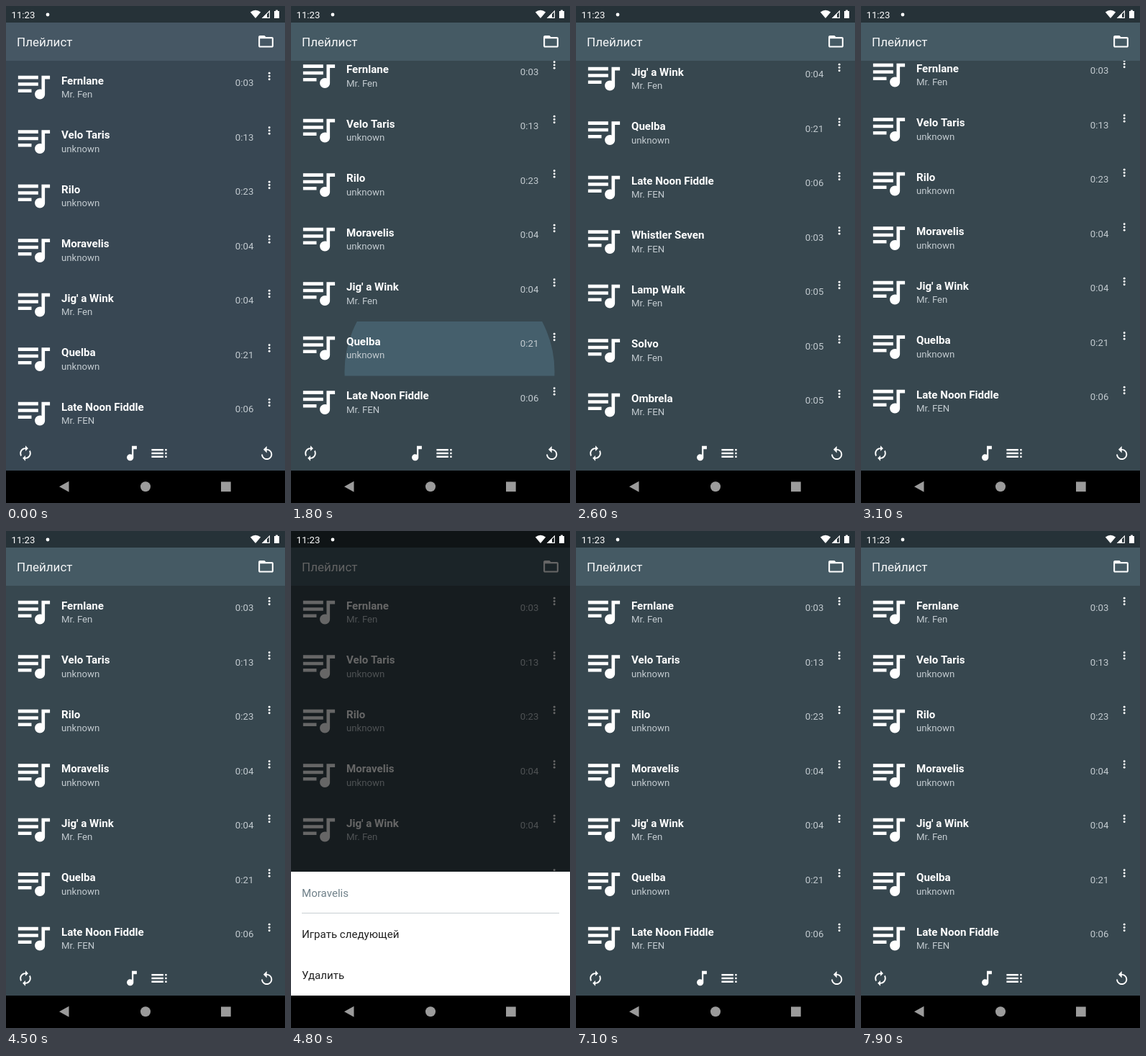
An HTML page with a canvas that plays this animation: 388 px wide and 690 px high, repeating every 8000 ms.

```html
<!DOCTYPE html>
<html lang="ru">
<head>
<meta charset="utf-8">
<style>
  html, body { margin: 0; width: 100%; height: 100%; overflow: hidden; background: #000; }
  canvas { display: block; width: 388px; height: 690px; }
</style>
</head>
<body>
<canvas id="stage"></canvas>
<script>
const W = 388, H = 690, LOOP = 8000, STEP = 100;
const TOP = 76, BOTTOM = 592, NAV = 645, ROW = 75.5;
const SHEET_TOP = 473, SHEET_H = NAV - SHEET_TOP;
const FONT = 'Roboto, "Noto Sans", sans-serif';

const tracks = [
  ['Fernlane', 'Mr. Fen', '0:03'],
  ['Velo Taris', 'unknown', '0:13'],
  ['Rilo', 'unknown', '0:23'],
  ['Moravelis', 'unknown', '0:04'],
  ["Jig' a Wink", 'Mr. Fen', '0:04'],
  ['Quelba', 'unknown', '0:21'],
  ['Late Noon Fiddle', 'Mr. FEN', '0:06'],
  ['Whistler Seven', 'Mr. FEN', '0:03'],
  ['Lamp Walk', 'Mr. Fen', '0:05'],
  ['Solvo', 'Mr. Fen', '0:05'],
  ['Ombrela', 'Mr. FEN', '0:05']
];

// 24-unit icon shapes
const icons = {
  queue: new Path2D('M15 6H3v2h12V6zm0 4H3v2h12v-2zM3 16h8v-2H3v2zM17 6v8.18c-.31-.11-.65-.18-1-.18-1.66 0-3 1.34-3 3s1.34 3 3 3 3-1.34 3-3V8h3V6h-5z'),
  folder: new Path2D('M20 6h-8l-2-2H4c-1.1 0-2 .9-2 2v12c0 1.1.9 2 2 2h16c1.1 0 2-.9 2-2V8c0-1.1-.9-2-2-2zm0 12H4V8h16v10z'),
  renew: new Path2D('M12 6v3l4-4-4-4v3c-4.42 0-8 3.58-8 8 0 1.57.46 3.03 1.24 4.26L6.7 14.8c-.45-.83-.7-1.79-.7-2.8 0-3.31 2.69-6 6-6zm6.76 1.74L17.3 9.2c.44.84.7 1.79.7 2.8 0 3.31-2.69 6-6 6v-3l-4 4 4 4v-3c4.42 0 8-3.58 8-8 0-1.57-.46-3.03-1.24-4.26z'),
  note: new Path2D('M12 3v10.55c-.59-.34-1.27-.55-2-.55-2.21 0-4 1.79-4 4s1.79 4 4 4 4-1.79 4-4V7h4V3h-6z'),
  list: new Path2D('M3 9h14V7H3v2zm0 4h14v-2H3v2zm0 4h14v-2H3v2zm16 0h2v-2h-2v2zm0-10v2h2V7h-2zm0 6h2v-2h-2v2z'),
  replay: new Path2D('M12 5V1L7 6l5 5V7c3.31 0 6 2.69 6 6s-2.69 6-6 6-6-2.69-6-6H4c0 4.42 3.58 8 8 8s8-3.58 8-8-3.58-8-8-8z')
};

// [time, scroll offset]
const scrollKeys = [
  [1700, 0], [1800, 15.5], [1900, 110], [2000, 220], [2100, 288], [2200, 314],
  [2700, 314], [2800, 255], [2900, 125], [3000, 50], [3100, 17], [3200, 4], [3300, 0]
];

const canvas = document.getElementById('stage');
const ctx = canvas.getContext('2d');
const dpr = window.devicePixelRatio || 1;
canvas.width = W * dpr;
canvas.height = H * dpr;

const ramp = (t, a, b) => Math.min(1, Math.max(0, (t - a) / (b - a)));
const mix = (a, b, k) => `rgb(${a.map((v, i) => v + (b[i] - v) * k)})`;

function track(keys, t) {
  let prev = keys[0];
  for (const key of keys) {
    if (t < key[0]) return prev[1] + (key[1] - prev[1]) * ramp(t, prev[0], key[0]);
    prev = key;
  }
  return prev[1];
}

function rect(x, y, w, h, color) {
  ctx.fillStyle = color;
  ctx.fillRect(x, y, w, h);
}

function disc(x, y, r, color) {
  ctx.fillStyle = color;
  ctx.beginPath();
  ctx.arc(x, y, r, 0, Math.PI * 2);
  ctx.fill();
}

function poly(points, color) {
  ctx.fillStyle = color;
  ctx.beginPath();
  points.forEach(([x, y]) => ctx.lineTo(x, y));
  ctx.closePath();
  ctx.fill();
}

function text(str, x, y, size, color, weight = 400, align = 'left') {
  ctx.font = `${weight} ${size}px ${FONT}`;
  ctx.textAlign = align;
  ctx.fillStyle = color;
  ctx.fillText(str, x, y);
}

function icon(name, cx, cy, scale, color = '#fff') {
  ctx.save();
  ctx.translate(cx - 12 * scale, cy - 12 * scale);
  ctx.scale(scale, scale);
  ctx.fillStyle = color;
  ctx.fill(icons[name], 'evenodd');
  ctx.restore();
}

function clip(x, y, w, h, draw) {
  ctx.save();
  ctx.beginPath();
  ctx.rect(x, y, w, h);
  ctx.clip();
  draw();
  ctx.restore();
}

function drawRow([name, artist, time], y) {
  icon('queue', 37.8, y + 34.8, 2.33);
  text(name, 77, y + 32.7, 15.1, '#fff', 700);
  text(artist, 77, y + 51.2, 13.2, '#c3cbd0');
  text(time, 344.3, y + 35.2, 13.2, '#c3cbd0', 400, 'right');
  for (let i = -1; i <= 1; i++) disc(366.2, y + 21.5 + i * 4.3, 1.45, '#fff');
}

function drawRipple(t, y) {
  if (t < 1750 || t >= 2000) return;
  const alpha = 0.5 * (1 - ramp(t, 1800, 2000));
  clip(0, y, W, ROW, () => disc(220.5, y + 69, 146 + (t - 1800) * 0.9, `rgba(84,120,137,${alpha})`));
}

function drawList(t) {
  const offset = track(scrollKeys, t);
  clip(0, TOP, W, BOTTOM - TOP, () => {
    tracks.forEach((item, i) => {
      const y = TOP + i * ROW - offset;
      if (y > BOTTOM || y < TOP - ROW) return;
      if (i === 5) drawRipple(t, y);
      drawRow(item, y);
    });
  });
}

function drawBars(settle) {
  rect(0, 0, W, 23, '#263238');
  rect(0, 23, W, TOP - 23, mix([70, 87, 100], [69, 90, 100], settle));
  text('Плейлист', 15, 56, 17, '#f4f6f7');
  icon('folder', 361.5, 49.3, 1.04);
  icon('renew', 27, 621, 0.97);
  icon('note', 175, 621, 1.15);
  icon('list', 213, 621, 1.18);
  icon('replay', 362.7, 621.5, 0.945);
}

// Slides over the navigation bar too
function drawSheet(slide, alpha) {
  const y = SHEET_TOP + slide * SHEET_H;
  ctx.globalAlpha = alpha;
  rect(0, y, W, SHEET_H, '#fff');
  text('Moravelis', 15, y + 34.5, 15.1, '#70818a');
  rect(15, y + 57, 358, 1, '#c8cfd2');
  text('Играть следующей', 15, y + 92.3, 15.1, '#212121');
  text('Удалить', 15, y + 149.3, 15.1, '#212121');
  ctx.globalAlpha = 1;
}

function drawStatus() {
  text('11:23', 7.5, 16.7, 13.2, '#fff');
  disc(58, 12, 2.4, '#fff');

  ctx.beginPath();
  ctx.moveTo(347, 17);
  ctx.lineTo(339.8, 8.4);
  ctx.quadraticCurveTo(347, 3, 354.2, 8.4);
  ctx.fill();

  ctx.strokeStyle = '#fff';
  ctx.lineWidth = 1.1;
  ctx.beginPath();
  ctx.moveTo(366.4, 7);
  ctx.lineTo(366.4, 16.4);
  ctx.lineTo(357, 16.4);
  ctx.closePath();
  ctx.stroke();
  poly([[356, 17], [363, 10], [363, 17]], '#fff');

  rect(373, 7, 7, 10, '#fff');
  rect(375, 5.6, 3, 2, '#fff');
}

function drawNav() {
  rect(0, NAV, W, H - NAV, '#000');
  const gray = '#9b9b9b';
  poly([[74, 667.3], [87.5, 659.8], [87.5, 674.8]], gray);
  disc(194, 667.3, 7, gray);
  rect(299, 660.5, 13.7, 13.7, gray);
}

function draw(t) {
  const settle = ramp(t, 0, 900);
  ctx.setTransform(dpr, 0, 0, dpr, 0, 0);
  rect(0, 0, W, H, mix([56, 71, 83], [55, 71, 79], settle));
  drawList(t);
  drawBars(settle);
  drawNav();

  if (t >= 4600 && t < 6500) {
    const enter = ramp(t, 4500, 4800);
    const leave = ramp(t, 6150, 6510);
    const dim = 0.6 * enter * (1 - leave * leave);
    rect(0, 0, W, NAV, `rgba(0,0,0,${dim})`);
    drawSheet((1 - enter) ** 2 + leave, enter * (1 - leave) ** 2);
  }
  drawStatus();
}

const start = performance.now();
function tick() {
  const t = (performance.now() - start) % LOOP;
  draw(Math.floor(t / STEP) * STEP);
  requestAnimationFrame(tick);
}
tick();
</script>
</body>
</html>
```
